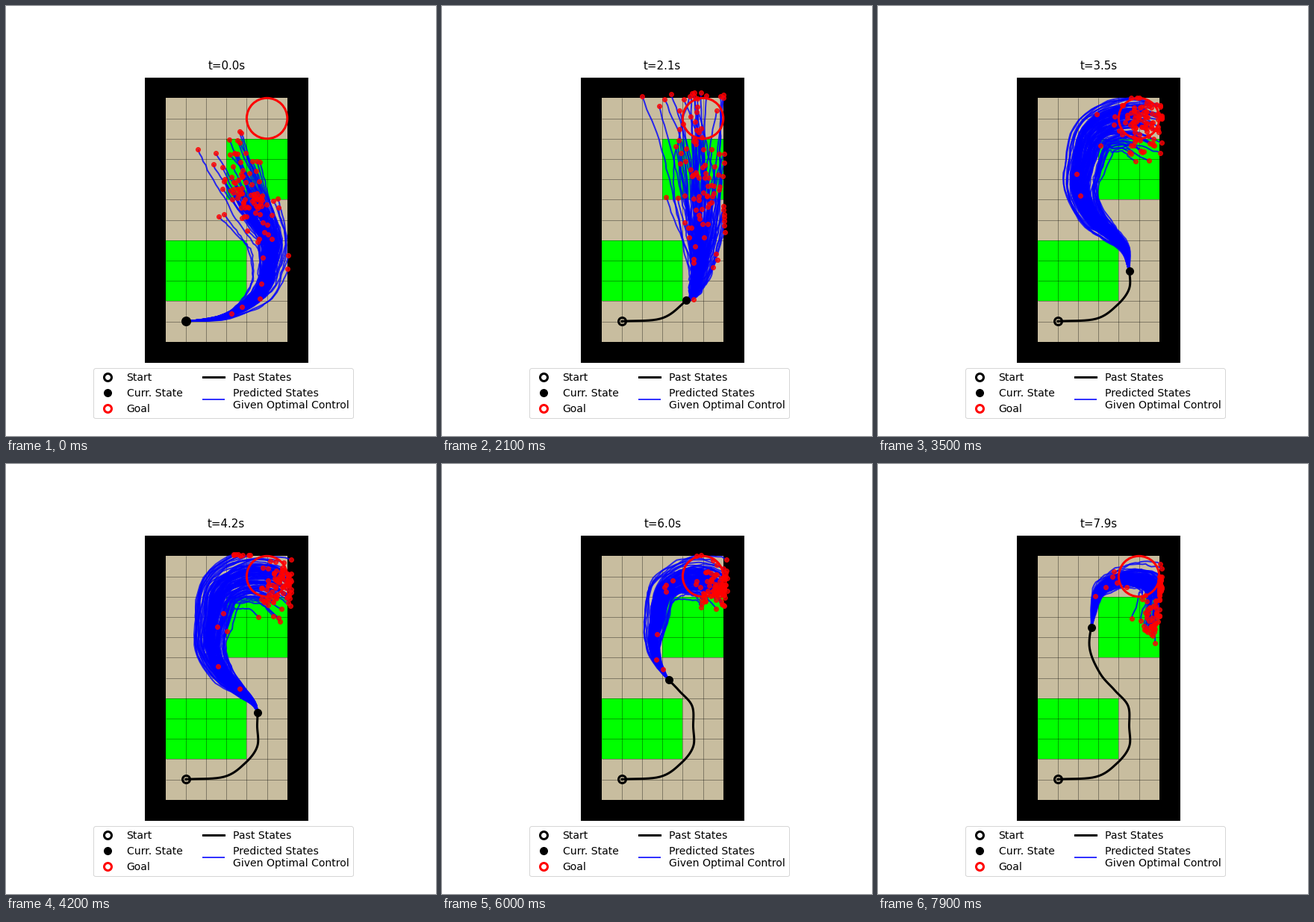
These frames come from a looping animation (576 by 576 pixels, 8000 ms). A matplotlib script:

```python
import numpy as np
import matplotlib.pyplot as plt
from matplotlib.animation import FuncAnimation
from matplotlib.collections import LineCollection
from matplotlib.lines import Line2D
from matplotlib.patches import Circle, Rectangle

SIZE, DPI = 576, 72
FRAMES, INTERVAL = 80, 100
CELL, LEFT, TOP = 27.2, 186.4, 96.12
X0, X1 = LEFT + CELL, LEFT + 7 * CELL
Y0, Y1 = TOP + CELL, TOP + 13 * CELL
N_PATHS = 100
KNOT_TIME = .9

# Route knots at even times; the last ones are planned but not yet driven
ROUTE = np.array([
    (240.8, 422.4), (292, 419), (320, 401), (336.5, 378.5), (336.5, 352),
    (335, 324), (317, 303), (297.5, 280.5), (283.5, 247), (287, 211),
    (296, 172), (324, 154), (354, 154), (376, 172), (374, 212),
])
TANGENT = np.gradient(ROUTE, axis=0)
S = np.arange(0, 1.5, 1 / 48)[:, None]


def route(u):
    """Catmull-Rom curve through the knots at knot positions u."""
    u = np.asarray(u, float).ravel()
    j = np.minimum(u.astype(int), len(ROUTE) - 2)
    f = (u - j)[:, None]
    return ((2 * f**3 - 3 * f**2 + 1) * ROUTE[j]
            + (f**3 - 2 * f**2 + f) * TANGENT[j]
            + (3 * f**2 - 2 * f**3) * ROUTE[j + 1]
            + (f**3 - f**2) * TANGENT[j + 1])


def mean_plan(t, straight):
    """Blend of the route ahead and a direct run upwards."""
    u = t / KNOT_TIME
    horizon = np.interp(t, [0, 2.9, 4.2, 6, 7.9], [7.2, 11.7, 12.7, 12.8, 14])
    swing = np.interp(t, [0, .9, 2.4, 2.9, 6], [18, 0, 0, -16, 0])
    s = np.minimum(S, 1)
    ahead = route(u + s * (horizon - u))
    direct = ((1 - s)**2 * route(u) + 2 * s * (1 - s) * (350, 400)
              + s**2 * (348, 195))
    plan = (1 - straight) * ahead + straight * direct
    plan[:, :1] += swing * np.sin(np.pi * s)
    end = np.searchsorted(S[:, 0], 1)
    slope = (plan[end] - plan[end - 1]) / (S[end] - S[end - 1])
    return plan + np.maximum(S - 1, 0) * slope


def predictions(frame):
    rng = np.random.default_rng(100 + frame)
    t = frame / 10
    straight = np.interp(t, [0, .9, 2.4, 2.7], [.4, 1, 1, 0])
    plan = mean_plan(t, straight)
    normal = np.gradient(plan, axis=0)[:, ::-1] * (-1, 1)
    normal /= np.linalg.norm(normal, axis=1, keepdims=True)
    spread = np.interp(t, [0, .9, 2.9, 7.9], [15, 27, 17, 9])
    spread = spread * S**(1 + .8 * straight)

    z, bend = np.clip(rng.standard_t(7, (2, N_PATHS, 1, 1)), -3, 3)
    phase = rng.uniform(0, 2 * np.pi, (N_PATHS, 1, 1))
    z = z + .35 * bend * np.sin(5 * S + phase)
    pts = plan + z * spread * normal
    wiggle = rng.normal(0, .7, pts.shape).cumsum(axis=1)
    pts += wiggle * np.minimum(3 * S, 1)

    # Some runs stop early; all stop with their first step into the wall
    length = rng.normal(1, .06 + .12 * straight, N_PATHS)
    early = rng.random(N_PATHS) < .06
    length[early] *= rng.uniform(.08, 1, early.sum())
    last = (48 * np.clip(length, .06, 1.45)).astype(int)
    x, y = pts[..., 0], pts[..., 1]
    out = (x < X0) | (x > X1) | (y < Y0) | (y > Y1)
    hit = np.where(out.any(axis=1), out.argmax(axis=1), len(S))
    return [p[:e + 1] for p, e in zip(pts, np.minimum(last, hit))]


def cell_rect(col, row, cols, rows, color, pad=0):
    ax.add_patch(Rectangle((LEFT + col * CELL, TOP + row * CELL),
                           cols * CELL + pad, rows * CELL + pad,
                           color=color, lw=0, zorder=0))


plt.rcParams["font.family"] = "DejaVu Sans"
fig = plt.figure(figsize=(SIZE / DPI, SIZE / DPI), dpi=DPI, facecolor="white")
ax = fig.add_axes([0, 0, 1, 1])
ax.set(xlim=(0, SIZE), ylim=(SIZE, 0))
ax.axis("off")

cell_rect(0, 0, 8, 14, "black", pad=1)
cell_rect(1, 1, 6, 12, "#c8bd9f")
cell_rect(4, 3, 3, 3, "#00ff00")
cell_rect(1, 8, 4, 3, "#00ff00")
grid = dict(color="black", lw=.5, alpha=.7, zorder=1)
ax.vlines(LEFT + CELL * np.arange(2, 7), Y0, Y1, **grid)
ax.hlines(TOP + CELL * np.arange(2, 13), X0, X1, **grid)

ring = dict(marker="o", ls="none", ms=10, mew=3, mfc="none")
dot = dict(marker="o", ls="none", ms=10, color="black")
ax.plot(*ROUTE[0], mec="black", zorder=6, **ring)
ax.add_patch(Circle((LEFT + 6 * CELL, TOP + 2 * CELL), CELL,
                    fill=False, ec="red", lw=3, zorder=4))

blue = dict(color="blue", lw=2, alpha=.8)
fan = LineCollection([], zorder=2, **blue)
ax.add_collection(fan, autolim=False)
ends, = ax.plot([], [], "o", color="red", ms=6, alpha=.8, zorder=3)
past, = ax.plot([], [], color="black", lw=3, zorder=5)
car, = ax.plot([], [], zorder=7, **dot)
title = ax.text(295.2, 85, "", fontsize=15, ha="center", va="baseline")

ax.legend(
    handles=[
        Line2D([], [], mec="black", label="Start", **ring),
        Line2D([], [], label="Curr. State", **dot),
        Line2D([], [], mec="red", label="Goal", **ring),
        Line2D([], [], color="black", lw=3, label="Past States"),
        Line2D([], [], label="Predicted States\nGiven Optimal Control", **blue),
    ],
    loc="center", bbox_to_anchor=(290.9 / SIZE, 57.3 / SIZE),
    ncol=2, fontsize=14, borderaxespad=0)


def update(frame):
    paths = predictions(frame)
    fan.set_segments(paths)
    ends.set_data(*np.array([p[-1] for p in paths]).T)
    trail = route(np.arange(frame + 1) / 10 / KNOT_TIME)
    past.set_data(*trail.T)
    car.set_data(*trail[-1:].T)
    title.set_text(f"t={frame / 10:.1f}s")
    return fan, ends, past, car, title


anim = FuncAnimation(fig, update, frames=FRAMES, interval=INTERVAL,
                     repeat=True, repeat_delay=0, blit=False)
plt.show()
```
